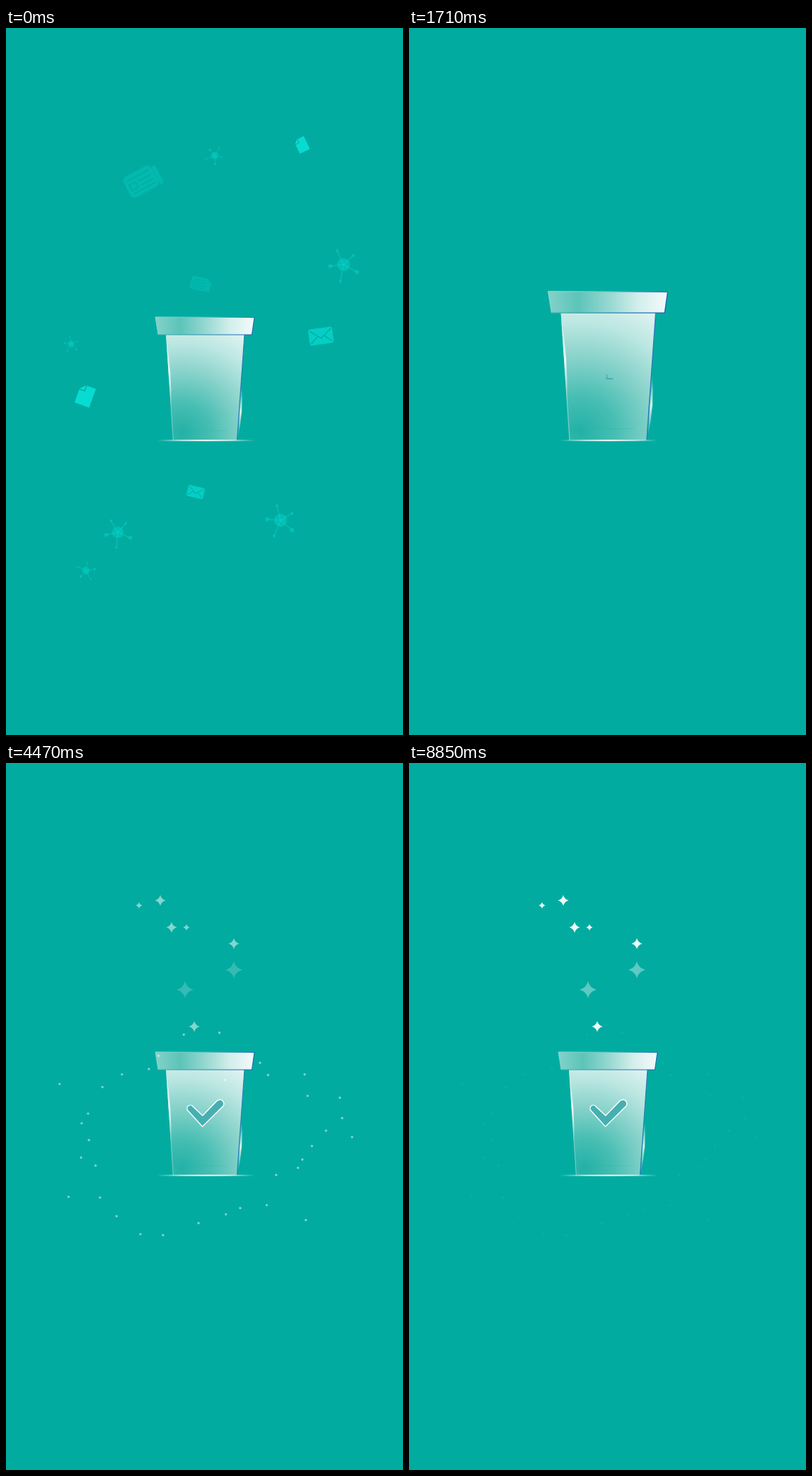
Animation of 561 by 998 pixels, one loop 9000 ms. Source, as an HTML page with a canvas:

```html
<!DOCTYPE html>
<html lang="en">
<head>
<meta charset="utf-8">
<title>Clean bin</title>
<style>
  html, body { margin: 0; width: 100%; height: 100%; overflow: hidden; background: #02aba0; }
  canvas { display: block; width: 561px; height: 998px; }
</style>
</head>
<body>
<canvas id="stage" width="561" height="998"></canvas>
<script>
const ctx = document.getElementById('stage').getContext('2d');
const LOOP = 9000, GLOW = '#08ddd3', TAU = Math.PI * 2, GOLDEN = 2.39996;

const clamp = x => Math.max(0, Math.min(1, x));
const span = (t, from, to) => clamp((t - from) / (to - from));
const mix = (a, b, p) => a + (b - a) * p;
const inOut = p => (1 - Math.cos(Math.PI * p)) / 2;
const expoOut = p => p >= 1 ? 1 : 1 - 2 ** (-10 * p);

let seed = 7;
function random() {
  seed = seed * 16807 % 2147483647;
  return seed / 2147483647;
}

// icons already in the air: kind, x, y, size, turn
const kindAlpha = { news: .28, mol: .38, doc: .95, env: .7 };
const flying = [
  ['news', 193, 215, 1, -.5], ['news', 275, 361, .56, .23],
  ['doc', 112, 519, 1, .35], ['doc', 418, 165, .72, -.45],
  ['env', 445, 435, 1, -.14], ['env', 268, 655, .7, .23],
  ['mol', 477, 334, 1, 0], ['mol', 295, 180, .56, 1], ['mol', 92, 446, .5, .3],
  ['mol', 113, 766, .58, -.7], ['mol', 388, 695, 1, .2], ['mol', 158, 712, .9, -.1]
].map(([kind, x, y, size, turn]) => ({
  kind, x, y, size, turn, alpha: kindAlpha[kind], from: 0, to: mix(800, 1120, random())
}));

// icons that appear later, on a wide ring
const arriving = Array.from({ length: 7 }, (_, i) => ({
  kind: Object.keys(kindAlpha)[i % 4],
  x: 281 + 240 * Math.cos(i * GOLDEN), y: 470 + 365 * Math.sin(i * GOLDEN),
  size: mix(.75, 1, random()), turn: mix(-.5, .5, random()),
  alpha: 0, from: 60 + 30 * i, to: 1050 + 15 * i
}));

const icons = [...flying, ...arriving];

// x, y, radius
const stars = [
  [188, 201, 4.7], [218, 194, 7.8], [234, 232, 7.8], [255, 232, 4.7],
  [322, 255, 7.8], [322, 292, 12], [253, 320, 12], [266, 372, 7.8]
];

// sparks scattered over a wide, hollow ellipse
const dots = Array.from({ length: 35 }, (_, i) => {
  const r = Math.sqrt(mix(.25, 1, random()));
  return [281 + 243 * r * Math.cos(i * GOLDEN), 528 + 153 * r * Math.sin(i * GOLDEN)];
});

function poly(points) {
  ctx.beginPath();
  points.forEach(p => ctx.lineTo(...p));
}

function line(points, width, style) {
  poly(points);
  ctx.lineWidth = width;
  ctx.strokeStyle = style;
  ctx.stroke();
}

// cuts a line out of the icon, down to the page colour
function cut(...points) {
  ctx.save();
  ctx.globalAlpha = 1;
  ctx.globalCompositeOperation = 'destination-out';
  line(points, 1.3, '#000');
  ctx.restore();
}

function disc(x, y, r) {
  ctx.beginPath();
  ctx.arc(x, y, r, 0, TAU);
  ctx.fill();
}

function fade(gradient, ...colours) {
  colours.forEach((c, i) => gradient.addColorStop(i / (colours.length - 1), c));
  return gradient;
}

const across = (x1, x2, ...colours) => fade(ctx.createLinearGradient(x1, 0, x2, 0), ...colours);

function placed(x, y, scale, angle, draw) {
  ctx.save();
  ctx.translate(x, y);
  ctx.rotate(angle);
  ctx.scale(scale, scale);
  draw();
  ctx.restore();
}

const shapes = {
  doc() {
    poly([[-4, -14], [11, -14], [11, 14], [-11, 14], [-11, -7]]);
    ctx.fill();
    cut([-11, -6], [-3, -6], [-3, -14]);
  },
  env() {
    ctx.beginPath();
    ctx.roundRect(-17, -11.5, 34, 23, 3);
    ctx.fill();
    cut([-15, -9], [0, 3], [15, -9]);
    for (const side of [-1, 1]) cut([15 * side, 9], [5 * side, 0]);
  },
  news() {
    ctx.beginPath();
    ctx.roundRect(-25, -16, 44, 33, 6);
    ctx.roundRect(19.5, -11, 6, 28, 3);
    ctx.fill();
    cut([-20, -3], [-10, -3], [-10, 6], [-20, 6], [-20, -3]);
    for (const y of [-9, 11]) cut([-20, y], [14, y]);
    for (const y of [-2, 5]) cut([-6, y], [14, y]);
  },
  mol() {
    disc(0, 0, 9);
    for (let i = 0; i < 5; i++) {
      const a = -.75 + i * TAU / 5, r = 19 + i % 3 * 2.5;
      const x = r * Math.cos(a), y = r * Math.sin(a);
      line([[0, 0], [x, y]], 1.6, GLOW);
      disc(x, y, 2 + i % 2);
    }
  }
};

function drawIcon(t, { kind, x, y, size, turn, alpha, from, to }) {
  if (t < from || t >= to) return;
  const p = span(t, from, to) ** 4;
  ctx.globalAlpha = Math.min(1, alpha + (t - from) / 300);
  ctx.fillStyle = GLOW;
  placed(mix(x, 281, p), mix(y, 425, p), size * (1 - .8 * p), turn + p, shapes[kind]);
  ctx.globalAlpha = 1;
}

// a thin gleam bulging from one edge
function gleam(x1, y1, x2, y2, bulge) {
  ctx.beginPath();
  ctx.moveTo(x1, y1);
  ctx.quadraticCurveTo((x1 + x2) / 2 + bulge, (y1 + y2) / 2, x2, y2);
  ctx.fillStyle = fade(ctx.createLinearGradient(x1, y1, x2, y2), '#fff0', '#ffffffd8', '#fff0');
  ctx.fill();
}

function drawBin() {
  poly([[226, 433], [337, 433], [326.5, 582], [236, 582]]);
  ctx.fillStyle = fade(ctx.createRadialGradient(248, 572, 0, 248, 572, 168),
    '#22b1a6', '#48beb3', '#84d1c9', '#bae6e1', '#e4f5f4');
  ctx.fill();
  line([[236, 568.5], [312, 568.5]], .6, '#2aa89c66');
  line([[226.5, 433], [236.3, 582]], 1, '#bfe9e488');
  line([[337, 433], [326.5, 582]], 1.1, '#2b78b8');
  gleam(226, 434, 233.5, 540, 5);
  gleam(332.8, 504, 327.6, 578, 6);

  poly([[211, 408], [351, 408.5], [347.5, 433], [215, 433]]);
  ctx.fillStyle = across(211, 351, '#83d2c9', '#5cc4b9', '#94d7d0', '#d2eeeb', '#f4fafc');
  ctx.fill();
  line([[215, 433], [211, 408]], 1, '#9bdcd5aa');
  line([[211, 408], [351, 408.5]], 1.1, across(211, 351, '#8fd8d0', '#6fc8c6', '#2a6fb6'));
  line([[351, 408.5], [347.5, 433], [215, 433]], 1.1, across(351, 215, '#1f5fb0', '#2c86b0', '#3bb0ac'));
}

function drawFloor() {
  ctx.fillStyle = across(213, 352, '#fff0', '#ffffffb0', '#fff', '#ffffffb0', '#fff0');
  ctx.fillRect(213, 581.2, 139, 2);
}

function drawCheck(t) {
  if (t < 1700) return;
  const grow = 1 - (1 - span(t, 1680, 2040)) ** 2;
  const scale = 1.37 * grow - .37 * inOut(span(t, 2040, 2400));
  const turn = Math.PI / 4 * (1 - span(t, 1710, 1950));
  placed(282, 494, scale * .96, turn, () => {
    ctx.beginPath();
    ctx.arc(-22.4, -6.6, 4, 2.4, 5.5);
    ctx.lineTo(-4.3, 5);
    ctx.lineTo(17.2, -17.2);
    ctx.arc(21, -13.6, 5.2, 3.92, 7.1);
    ctx.lineTo(-4.6, 19);
    ctx.closePath();
    ctx.lineWidth = 3;
    ctx.strokeStyle = `rgba(250, 255, 255, ${grow})`;
    ctx.stroke();
    ctx.fillStyle = '#47afb0';
    ctx.fill();
  });
}

function drawStar(t, [x, y, r]) {
  if (t < 1890) return;
  const p = Math.sin(span(t, 1890, 2760) * Math.PI / 2);
  const light = mix(.38, 1, span(t, 3000, 8200));
  ctx.globalAlpha = light * (r > 10 ? .36 : .92);
  ctx.fillStyle = '#fff';
  placed(x, y + 7.2 * r * (1 - p), r * p, 0, () => {
    ctx.beginPath();
    ctx.moveTo(0, -1);
    for (let i = 0; i < 4; i++) {
      const a = i * TAU / 4;
      ctx.quadraticCurveTo(.28 * Math.cos(a - TAU / 8), .28 * Math.sin(a - TAU / 8), Math.cos(a), Math.sin(a));
    }
    ctx.fill();
  });
  ctx.globalAlpha = 1;
}

function drawDots(t) {
  if (t <= 1720) return;
  const p = expoOut(span(t, 1720, 2700));
  ctx.globalAlpha = .9 * (t < 2000 ? 1 : inOut(t / 1000 + 1));
  ctx.fillStyle = '#fff';
  for (const [x, y] of dots) disc(mix(281, x, p), mix(498, y, p), 1.7);
  ctx.globalAlpha = 1;
}

function render(t) {
  ctx.clearRect(0, 0, 561, 998);
  icons.forEach(icon => drawIcon(t, icon));
  const swell = 1 + .208 * (inOut(span(t, 1200, 1700)) - inOut(span(t, 1700, 2140)));
  placed(281, 582, swell, 0, () => {
    ctx.translate(-281, -582);
    drawBin();
  });
  drawFloor();
  drawCheck(t);
  stars.forEach(star => drawStar(t, star));
  drawDots(t);
}

const start = performance.now();
function tick() {
  render(Math.min((performance.now() - start) % LOOP, 8850));
  requestAnimationFrame(tick);
}
tick();
</script>
</body>
</html>
```
